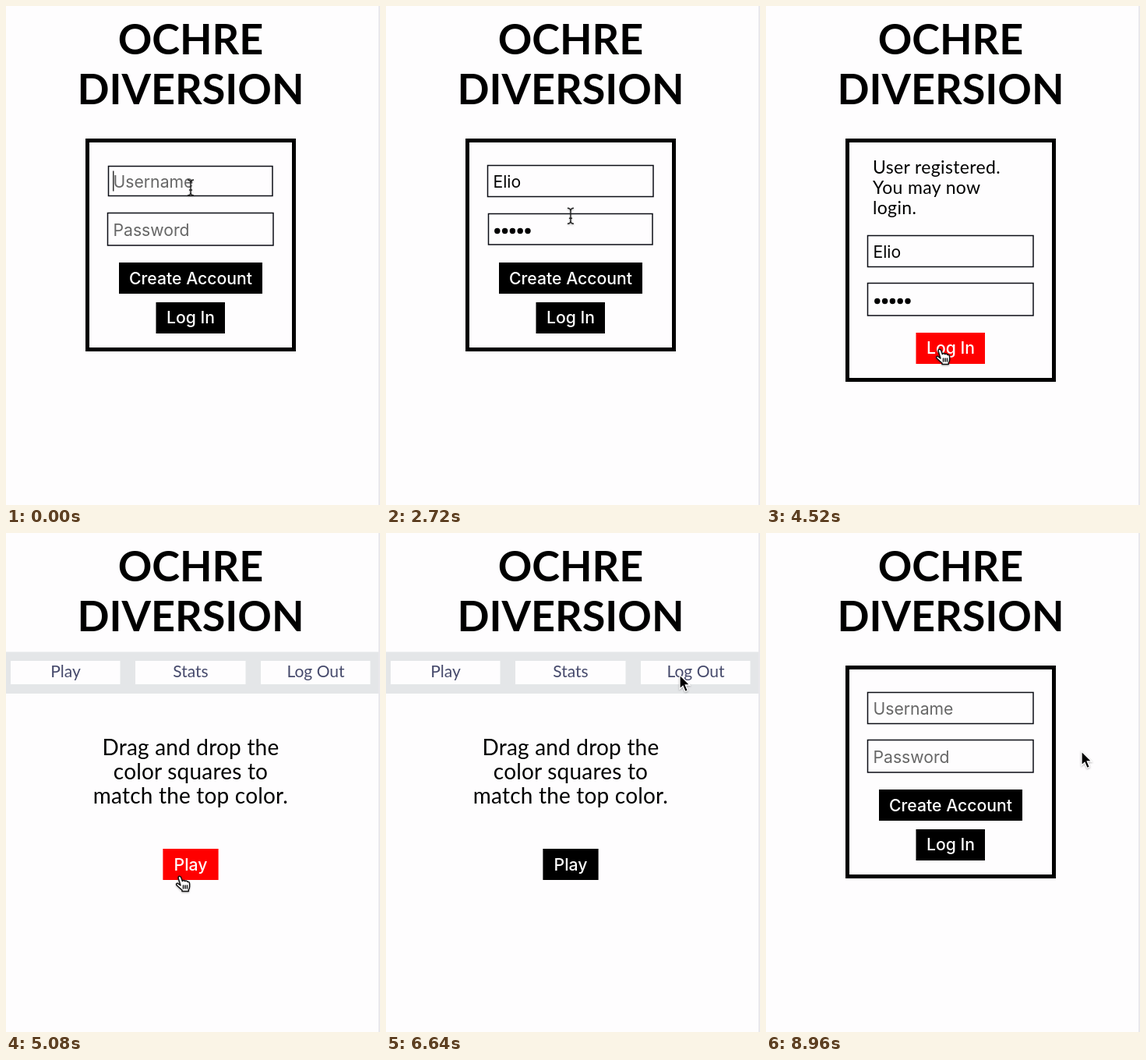
Write an HTML page that moves like this. It is 480 px wide and 640 px high and loops after 9 s.

```html
<!DOCTYPE html>
<html lang="en">
<head>
<meta charset="utf-8">
<title>Color matching game</title>
<style>
  html, body { margin: 0; width: 100%; height: 100%; overflow: hidden; background: #fefdfe; }
  svg { display: block; width: 480px; height: 640px; }
  text { font-family: Lato, sans-serif; }
  .title { font-size: 54px; font-weight: 700; text-anchor: middle; }
  .ui { font-family: Inter, sans-serif; font-size: 21.2px; }
  .hint { fill: #666; }
  .label { fill: #fff; font-weight: 500; text-anchor: middle; }
  .note { font-size: 23px; letter-spacing: .35px; }
  .nav { font-size: 21px; fill: #464a6c; text-anchor: middle; }
  .intro { font-size: 28px; letter-spacing: .2px; text-anchor: middle; }
  .field { fill: none; stroke: #0b0d14; stroke-width: 1.5; }
  #pointer { filter: drop-shadow(0 1px 1px rgba(0, 0, 0, .3)); }
</style>
</head>
<body>
<svg viewBox="0 0 480 640">
  <rect width="480" height="640" fill="#fefdfe"/>
  <rect x="478" width="2" height="640" fill="#e9e8ec"/>
  <text class="title" x="237" y="62">OCHRE</text>
  <text class="title" x="237" y="126">DIVERSION</text>

  <g id="login">
    <rect id="panel" x="104.5" y="172.5" width="265" height="268" fill="none" stroke="#000" stroke-width="5"/>
    <g id="note" class="note">
      <text x="137" y="215">User registered.</text>
      <text x="137" y="241">You may now</text>
      <text x="137" y="267">login.</text>
    </g>
    <g id="inputs">
      <rect id="userBox" class="field"/>
      <rect id="passBox" class="field"/>
      <text id="user" class="ui" x="137.5" y="232.5"></text>
      <text id="passHint" class="ui hint" x="137.5" y="295">Password</text>
      <g id="dots"></g>
      <rect id="caret" width="1.2" height="26"/>
    </g>
    <g id="create">
      <rect x="145" y="329" width="184" height="40"/>
      <text class="ui label" x="237" y="357">Create Account</text>
    </g>
    <g id="enter">
      <rect x="192.5" y="380" width="88.5" height="40"/>
      <text class="ui label" x="237" y="407">Log In</text>
    </g>
  </g>

  <g id="home">
    <rect y="152.5" width="478" height="53.5" fill="#e4e6e8"/>
    <g fill="#fefdfe">
      <rect x="6" y="164" width="140.5" height="30"/>
      <rect x="166" y="164" width="141.5" height="30"/>
      <rect x="327" y="164" width="140.5" height="30"/>
    </g>
    <text class="nav" x="76.5" y="185">Play</text>
    <text class="nav" x="237" y="185">Stats</text>
    <text class="nav" x="397.5" y="185">Log Out</text>
    <text class="intro" x="237" y="285">Drag and drop the</text>
    <text class="intro" x="237" y="316">color squares to</text>
    <text class="intro" x="237" y="347">match the top color.</text>
    <g id="play">
      <rect x="201.4" y="405" width="71.2" height="40"/>
      <text class="ui label" x="237" y="433">Play</text>
    </g>
  </g>

  <g id="pointer">
    <path id="ibeam" d="M-4-10Q0-10 0-6Q0-10 4-10M0-7V7M-4 10Q0 10 0 6Q0 10 4 10M-2 3H2" fill="none" stroke="#222" stroke-width="1.4"/>
    <path id="arrow" d="M0 0V18L4 14.3L7 21.5L10.3 20L7.3 13H13Z" stroke="#fff" stroke-width="1.3"/>
    <g id="hand" stroke="#111" stroke-width="1.5" stroke-linejoin="round" stroke-linecap="round">
      <path fill="#fff" d="M2 12L-.8 3Q-1.2 .4 .8 .3Q2.4 .3 3 2.4L4.4 6.5Q6.2 4.6 7.7 6.6Q9.8 5.2 10.8 7.5Q13.4 6.8 13.6 10V13.500Q13.500 16 12.3 17.500V19.500H4V18Q1 15.500-3.2 11.500Q-4-.500+9-1.500 9.300Z"/>
      <path fill="none" d="M5.5 12V16M8 12V16M10.5 12V16"/>
    </g>
  </g>
</svg>
<script>
const LOOP = 9000;
const NAME = 'Elio';
const KEYS = [420, 600, 780, 960];
const DOT_KEYS = [1640, 1780, 1920, 2060, 2200];
const TAB = 1420, REGISTER = 3280, LOGIN = 4800, LOGOUT = 6840;

// time, x, y, pointer shape until the next row
const PATH = [
  [0, 237, 233, 'ibeam'], [400, 237, 233, ''],
  [2560, 237, 233, 'ibeam'], [2720, 237, 269, 'ibeam'],
  [2860, 228, 309, 'arrow'], [2940, 221, 330, 'hand'],
  [3040, 213, 344, 'hand'], [REGISTER, 213, 344, 'arrow'],
  [3680, 213, 344, 'arrow'], [3760, 215, 357, 'ibeam'],
  [3960, 220, 397, 'arrow'], [4060, 221, 420, 'hand'],
  [4180, 222, 440, 'hand'], [5140, 222, 440, 'hand'],
  [5320, 240, 403, 'arrow'], [5520, 275, 355, 'arrow'],
  [6320, 377, 182, 'arrow'], [7200, 377, 182, 'arrow'],
  [7700, 405, 280, 'arrow'], [LOOP, 405, 280, 'arrow']
];

const $ = id => document.getElementById(id);
const show = (id, on) => { $(id).style.display = on ? '' : 'none'; };
const shift = (id, y) => $(id).setAttribute('transform', `translate(0 ${y})`);
const set = (id, attrs) => {
  for (const key in attrs) $(id).setAttribute(key, attrs[key]);
};
const count = (times, t) => times.filter(k => t >= k).length;

$('hand').firstElementChild.setAttribute('d',
  'M2 12L-.8 3Q-1.2 .3 .8 .3Q2.4 .3 3 2.4L4.4 6.5Q6.2 4.6 7.7 6.6Q9.8 5.2 10.8 7.5' +
  'Q13.4 6.8 13.6 10V13.5Q13.5 16 12.3 17.5V19.5H4V18Q1 15.5-3.2 11.5Q-4 9-1.5 9.3Z');

DOT_KEYS.forEach((_, i) => {
  const dot = document.createElementNS('http://www.w3.org/2000/svg', 'circle');
  $('dots').append(dot);
  dot.setAttribute('cx', 142.8 + 9.8 * i);
  dot.setAttribute('cy', 288.5);
  dot.setAttribute('r', 3.7);
});

function pointerAt(t) {
  const i = PATH.findIndex((row, n) => n && t < row[0]);
  const [t0, x0, y0, shape] = PATH[i - 1];
  const [t1, x1, y1] = PATH[i];
  const p = (t - t0) / (t1 - t0);
  return { x: x0 + (x1 - x0) * p, y: y0 + (y1 - y0) * p, shape };
}

function drawField(id, y, height, focused) {
  const inset = focused ? 1 : 0;
  set(id, { x: 130.5 + inset, y: y + inset, width: 212.5 - 2 * inset, height: height - 2 * inset });
}

function drawForm(t) {
  const fresh = t >= LOGOUT;
  const registered = t >= REGISTER && !fresh;
  const focus = t >= REGISTER ? '' : t < TAB ? 'user' : 'pass';
  const typed = fresh ? 0 : count(KEYS, t);
  const dots = fresh ? 0 : count(DOT_KEYS, t);

  show('note', registered);
  show('create', !registered);
  shift('inputs', registered ? 90 : 0);
  shift('enter', registered ? 39 : 0);
  $('panel').setAttribute('height', registered ? 307 : 268);

  drawField('userBox', 204.5, 40, focus === 'user');
  drawField('passBox', 265.5, 41.5, focus === 'pass');
  $('user').textContent = typed ? NAME.slice(0, typed) : 'Username';
  $('user').classList.toggle('hint', !typed);
  show('passHint', !dots);
  [...$('dots').children].forEach((dot, i) => { dot.style.display = i < dots ? '' : 'none'; });

  const inUser = focus === 'user';
  const textWidth = inUser ? (typed ? $('user').getComputedTextLength() : 0) : dots * 9.8;
  set('caret', { x: 137.2 + textWidth, y: inUser ? 211.5 : 273.5 });
  show('caret', focus && !(t >= 2640 && t < 3140));
}

function draw(t) {
  const home = t >= LOGIN && t < LOGOUT;
  show('login', !home);
  show('home', home);
  if (!home) drawForm(t);

  const { x, y, shape } = pointerAt(t);
  for (const id of ['ibeam', 'arrow', 'hand']) show(id, id === shape);
  $('pointer').setAttribute('transform', `translate(${x} ${y})`);

  const hot = shape !== 'hand' ? '' : home ? 'play' : t < REGISTER ? 'create' : 'enter';
  for (const id of ['create', 'enter', 'play']) {
    $(id).firstElementChild.setAttribute('fill', id === hot ? '#f00' : '#000');
  }
}

const start = performance.now();
function tick() {
  draw((performance.now() - start) % LOOP);
  requestAnimationFrame(tick);
}
tick();
</script>
</body>
</html>
```
